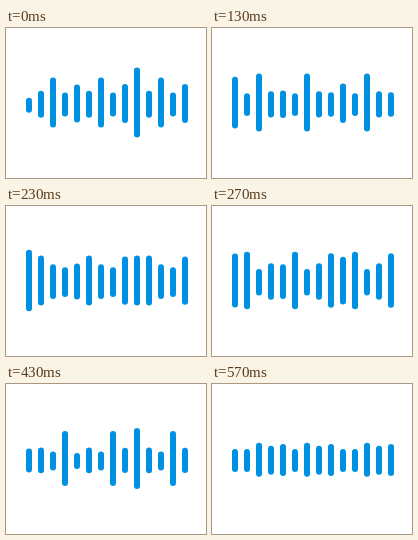
Recreate the animation shown at these times as an HTML page with a canvas. Size 200 by 150 pixels, loop 610 ms.

```html
<!DOCTYPE html>
<html lang="en">
<head>
<meta charset="utf-8">
<title>Sound wave</title>
<style>
html, body { margin: 0; width: 100%; height: 100%; overflow: hidden; background: #fff; }
canvas { display: block; }
</style>
</head>
<body>
<canvas id="stage" width="200" height="150"></canvas>
<script>
const LOOP = 610, LAST = 17;
const ctx = document.getElementById('stage').getContext('2d');

// Each voice swells between a few [step, height] turning points
const voices = {
  rise: [[0, 15], [6, 64], [12, 24], [LAST, 23]],
  hill: [[0, 27], [3, 20], [9, 60], [14, 22], [LAST, 23]],
  dip: [[0, 50], [2, 64], [11, 14], [LAST, 34]],
  late: [[0, 24], [2, 36], [5, 23], [12, 58], [LAST, 29]],
  sway: [[0, 39], [3, 22], [9, 57], [14, 22], [LAST, 32]],
  calm: [[0, 38], [2, 23], [7, 36], [13, 16], [LAST, 32]],
  loud: [[0, 70], [2, 34], [7, 50], [10, 41], [13, 61], [LAST, 23]]
};
const bars = 'rise hill dip late calm hill dip late sway loud hill dip late sway'.split(' ');

function heightAt(points, step) {
  const next = Math.max(1, points.findIndex(([s]) => s >= step));
  const [s0, h0] = points[next - 1], [s1, h1] = points[next];
  const ease = (1 - Math.cos(Math.PI * (step - s0) / (s1 - s0))) / 2;
  return h0 + (h1 - h0) * ease;
}

function drawBar(x, height) {
  // Taller bars sit slightly higher
  const middle = Math.max(74.5, 78.3 - 0.075 * height);
  const reach = height / 2 - 3;
  ctx.beginPath();
  ctx.moveTo(x, middle - reach);
  ctx.lineTo(x, middle + reach);
  ctx.stroke();
}

function draw(time) {
  // 30 steps per second, held on 10 ms ticks
  const tick = Math.floor((time % LOOP) / 10);
  const step = Math.min(LAST, Math.floor((tick * 3 + 1) / 10));
  ctx.clearRect(0, 0, 200, 150);
  ctx.strokeStyle = '#0090e2';
  ctx.lineWidth = 6;
  ctx.lineCap = 'round';
  bars.forEach((voice, i) => drawBar(23 + 12 * i, heightAt(voices[voice], step)));
}

const start = performance.now();
function loop() {
  draw(performance.now() - start);
  requestAnimationFrame(loop);
}
loop();
</script>
</body>
</html>
```
